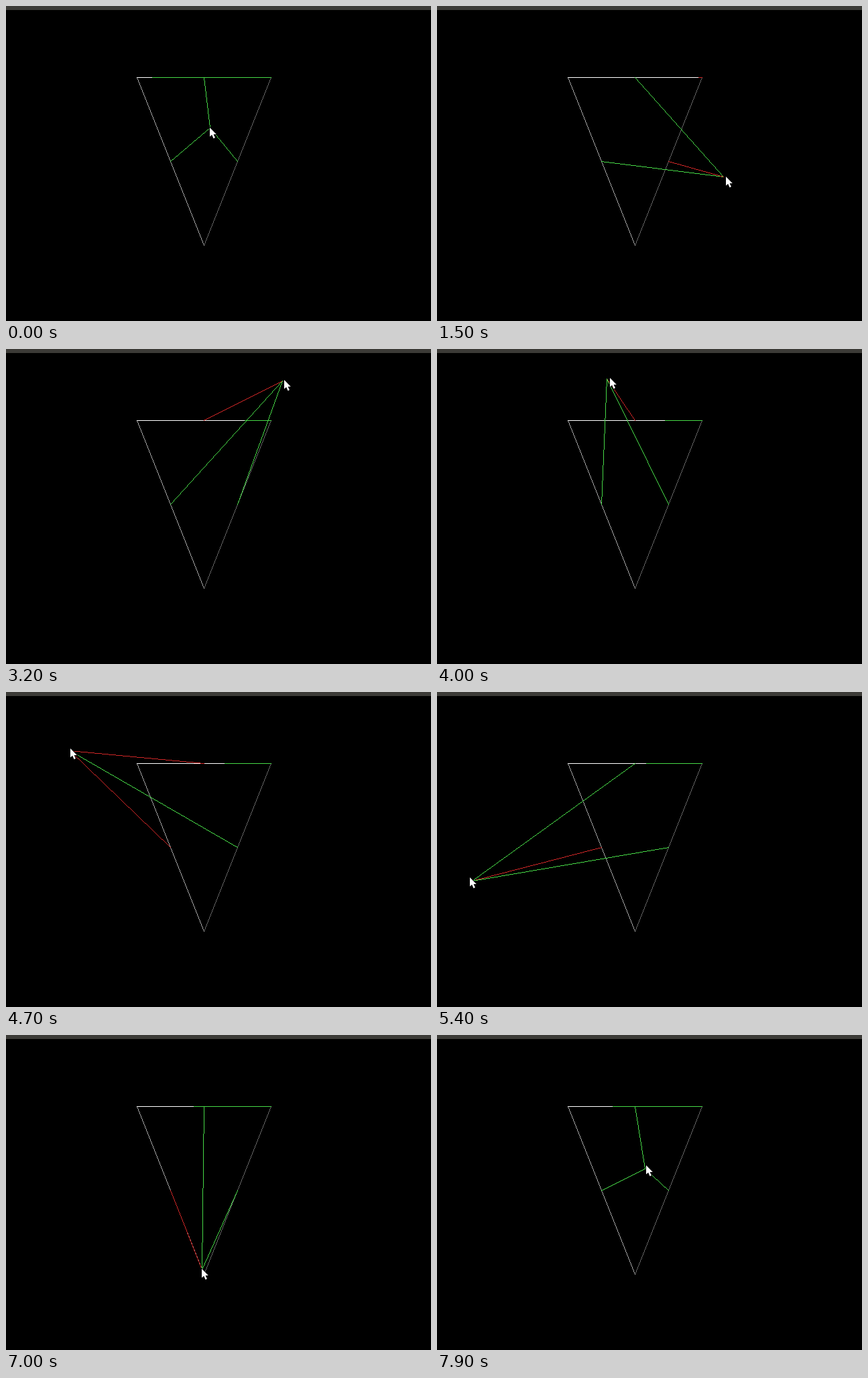
These frames come from a looping animation (634x469 px, 8000 ms). An HTML page with a canvas:

```html
<!DOCTYPE html>
<html>
<head>
<meta charset="utf-8">
<title>Triangle edge test</title>
<style>
  html, body { margin: 0; width: 100%; height: 100%; overflow: hidden; background: #000; }
  canvas { display: block; }
</style>
</head>
<body>
<canvas id="stage" width="634" height="469"></canvas>
<script>
const ctx = document.getElementById('stage').getContext('2d');
const STEP = 100, STEPS = 80;
const GREEN = '#46d746', RED = '#cc2626';

const A = [195, 106], B = [395, 106], C = [295, 356];
// Clockwise edges: a point is inside when it lies to the right of each
const edges = [[C, A], [A, B], [B, C]];

// Key points as [step, x, y]
const track = [
  [0, 304, 181], [9, 349, 233], [15, 427, 254], [18, 481, 217], [22, 516, 150],
  [27, 478, 64], [32, 412, 47], [40, 253, 44], [45, 134, 58], [50, 51, 152],
  [54, 52, 281], [62, 201, 427], [66, 268, 432], [72, 298, 306], [79, 310, 199]
];
// The pointer's drift from the tracked point
const drift = [
  [0, 0, 0], [15, 4, 0], [32, 3, -1], [40, 5, -1], [54, -3, -5], [62, -2, 1], [79, 2, -5]
];

function slope(keys, i, k) {
  const a = keys[Math.max(i - 1, 0)], b = keys[Math.min(i + 1, keys.length - 1)];
  return (b[k] - a[k]) / (b[0] - a[0]);
}

// Smooth cubic curve through the keys
function along(keys, n) {
  let i = 0;
  while (i < keys.length - 2 && keys[i + 1][0] <= n) i++;
  const a = keys[i], b = keys[i + 1], d = b[0] - a[0];
  const u = (n - a[0]) / d, v = 1 - u;
  return [1, 2].map(k => Math.round(
    v * v * (1 + 2 * u) * a[k] + u * u * (1 + 2 * v) * b[k]
    + d * u * v * (v * slope(keys, i, k) - u * slope(keys, i + 1, k))));
}

// One-pixel line without smoothing
function line([x0, y0], [x1, y1], color) {
  const dx = x1 - x0, dy = y1 - y0;
  const n = Math.max(Math.abs(dx), Math.abs(dy), 1);
  ctx.fillStyle = color;
  for (let i = 0; i <= n; i++) {
    ctx.fillRect(Math.round(x0 + dx * i / n), Math.round(y0 + dy * i / n), 1, 1);
  }
}

const inside = ([a, b], p) =>
  (b[0] - a[0]) * (p[1] - a[1]) - (b[1] - a[1]) * (p[0] - a[0]) >= 0;

const middle = ([a, b]) => [(a[0] + b[0]) / 2, (a[1] + b[1]) / 2];

const arrow = new Path2D('M0 0V13.6L3.1 10.8L5.6 16.2L7.9 15.1L5.6 10H9.8Z');

function pointer(x, y) {
  ctx.save();
  ctx.translate(x, y);
  ctx.lineWidth = 1.8;
  ctx.strokeStyle = '#000';
  ctx.stroke(arrow);
  ctx.fillStyle = '#fff';
  ctx.fill(arrow);
  ctx.restore();
}

function draw(n) {
  ctx.fillStyle = '#000';
  ctx.fillRect(0, 0, 634, 469);
  ctx.fillStyle = '#3c3b37';
  ctx.fillRect(0, 0, 634, 6);

  const p = along(track, n), off = along(drift, n);
  const colors = edges.map(e => inside(e, p) ? GREEN : RED);

  line(B, C, '#646464');
  line(C, A, '#a5a5a5');
  line(A, B, '#fff');

  // The bar grows leftward in the colour of the right edge's test
  let split = Math.round(218.4 - 1.99 * n);
  if (split < A[0]) split += 201;
  line([Math.min(split, B[0]), A[1]], B, colors[2]);

  edges.forEach((e, i) => line(middle(e), p, colors[i]));
  pointer(p[0] + off[0], p[1] + off[1]);
}

function tick() {
  draw(Math.floor(performance.now() / STEP) % STEPS);
  requestAnimationFrame(tick);
}
tick();
</script>
</body>
</html>
```
